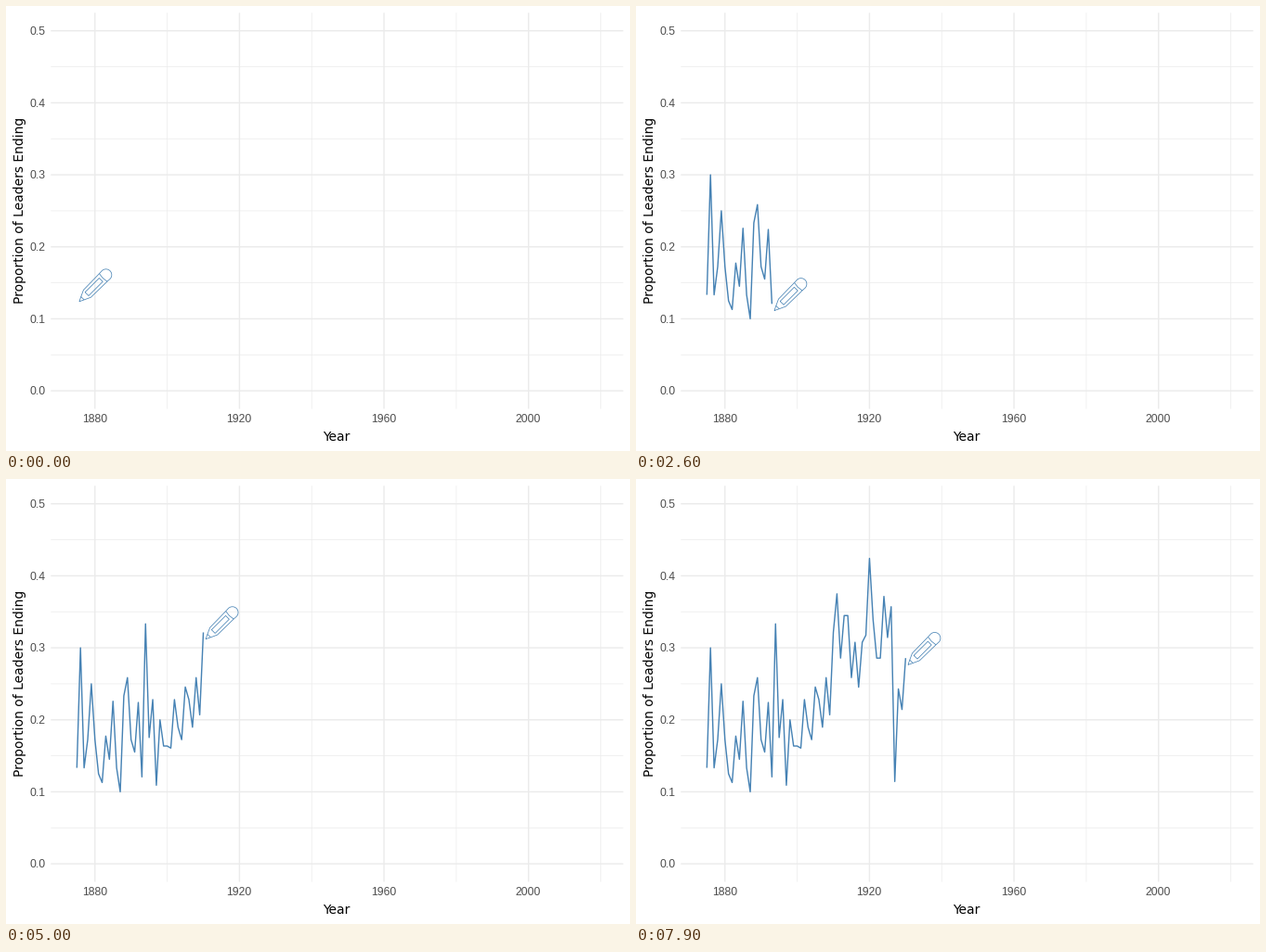
These frames come from a looping animation (672 px wide and 480 px high, 8000 ms). A matplotlib script:

```python
import numpy as np
import matplotlib.pyplot as plt
from matplotlib.animation import FuncAnimation

W, H, DPI = 672, 480, 96
PT = 72 / DPI
FRAMES, INTERVAL = 80, 100
LEFT, RIGHT, TOP, BOTTOM = 48.3, 664.7, 7.33, 434.5
BLUE, GRID, TICK = "#4682B4", "#EBEBEB", "#4D4D4D"
START = 1875

share = np.array([
    .1333, .3, .1333, .1724, .25, .1724, .125, .1129, .1774, .1452,
    .2258, .1333, .1, .2333, .2586, .1724, .1552, .2241, .1207, .3333,
    .1754, .2281, .1091, .2, .1636, .1636, .1607, .2281, .1897, .1724,
    .2456, .2281, .1897, .2586, .2069, .3214, .375, .2857, .3448, .3448,
    .2586, .3077, .2453, .3077, .3175, .4242, .339, .2857, .2857, .3714,
    .3143, .3571, .1143, .2429, .2143, .2857])
step = np.arange(len(share))
# each year is pinned to a whole frame, 139 years over 199 frames
keys = np.round(step * 199 / 139)


def px(year):
    return LEFT + (year - 1867.8) * (RIGHT - LEFT) / 158.4


def py(value):
    return BOTTOM - (value + .025) * (BOTTOM - TOP) / .55


fig = plt.figure(figsize=(W / DPI, H / DPI), dpi=DPI, facecolor="white")
ax = fig.add_axes([0, 0, 1, 1])
ax.set_xlim(0, W)
ax.set_ylim(H, 0)
ax.axis("off")


def stroke(x, y, color, width, **kw):
    return ax.plot(x, y, color=color, lw=width * PT, snap=False,
                   solid_capstyle="butt", **kw)[0]


def label(x, y, text, size, color, font, **kw):
    ax.text(x, y, text, fontsize=size * PT, color=color, family=font, **kw)


def vline(year, width):
    stroke([px(year)] * 2, [TOP, BOTTOM], GRID, width)


def hline(value, width):
    stroke([LEFT, RIGHT], [py(value)] * 2, GRID, width)


for i in range(5):
    hline(.05 + .1 * i, .71)
for year in range(1900, 2021, 40):
    vline(year, .71)
for i in range(6):
    hline(i / 10, 1.42)
    label(42.5, py(i / 10) + 4.3, f"{i / 10:.1f}", 12.1, TICK,
          "Liberation Sans", ha="right", va="baseline")
for year in range(1880, 2001, 40):
    vline(year, 1.42)
    label(px(year) - .2, 449, str(year), 12.2, TICK,
          "Liberation Sans", ha="center", va="baseline")

label(356.2, 469, "Year", 13.83, "black", "DejaVu Sans",
      ha="center", va="baseline")
label(18.6, 220.6, "Proportion of Leaders Ending", 13.83, "black",
      "DejaVu Sans", rotation=90, ha="right", va="center",
      rotation_mode="default") if False else \
    label(18.6, 220.6, "Proportion of Leaders Ending", 13.83, "black",
          "DejaVu Sans", rotation=90, rotation_mode="anchor",
          ha="center", va="baseline")


def pencil_parts():
    """Outlines as (along, across) from the tip, turned to 45 degrees."""
    a = np.linspace(-np.pi / 2, np.pi / 2, 24)
    cap = np.column_stack([40.6 + 6.2 * np.cos(a), 6.2 * np.sin(a)])
    body = np.vstack([[(0, 0), (5, -2.4), (12, -5.6), (36.5, -6)],
                      cap, [(36.5, 6), (12, 5.6), (5, 2.4), (0, 0)]])
    parts = [body,
             [(5, -2.4), (5, 2.4)],
             [(36.5, -6), (35.8, 0), (36.5, 6)],
             [(11.5, -2.7), (33, -2.7), (33, 2.7), (11.5, 2.7), (11.5, -2.7)]]
    turn = np.array([[1, -1], [1, 1]]) / np.sqrt(2)
    return [np.asarray(p) @ turn + (2.6, 7.2) for p in parts]


series = stroke([], [], BLUE, 1.42, solid_joinstyle="round", zorder=3)
parts = pencil_parts()
pencil = [stroke([], [], BLUE, .75, zorder=4) for _ in parts]


def draw(frame):
    t = np.interp(frame, keys, step)
    value = np.interp(t, step, share)
    done = step < t
    series.set_data(px(START + np.append(step[done], t)),
                    py(np.append(share[done], value)))
    for line, part in zip(pencil, parts):
        line.set_data(px(START + t) + part[:, 0], py(value) + part[:, 1])
    return [series, *pencil]


anim = FuncAnimation(fig, draw, frames=FRAMES, interval=INTERVAL,
                     repeat=True, repeat_delay=0)
plt.show()
```
